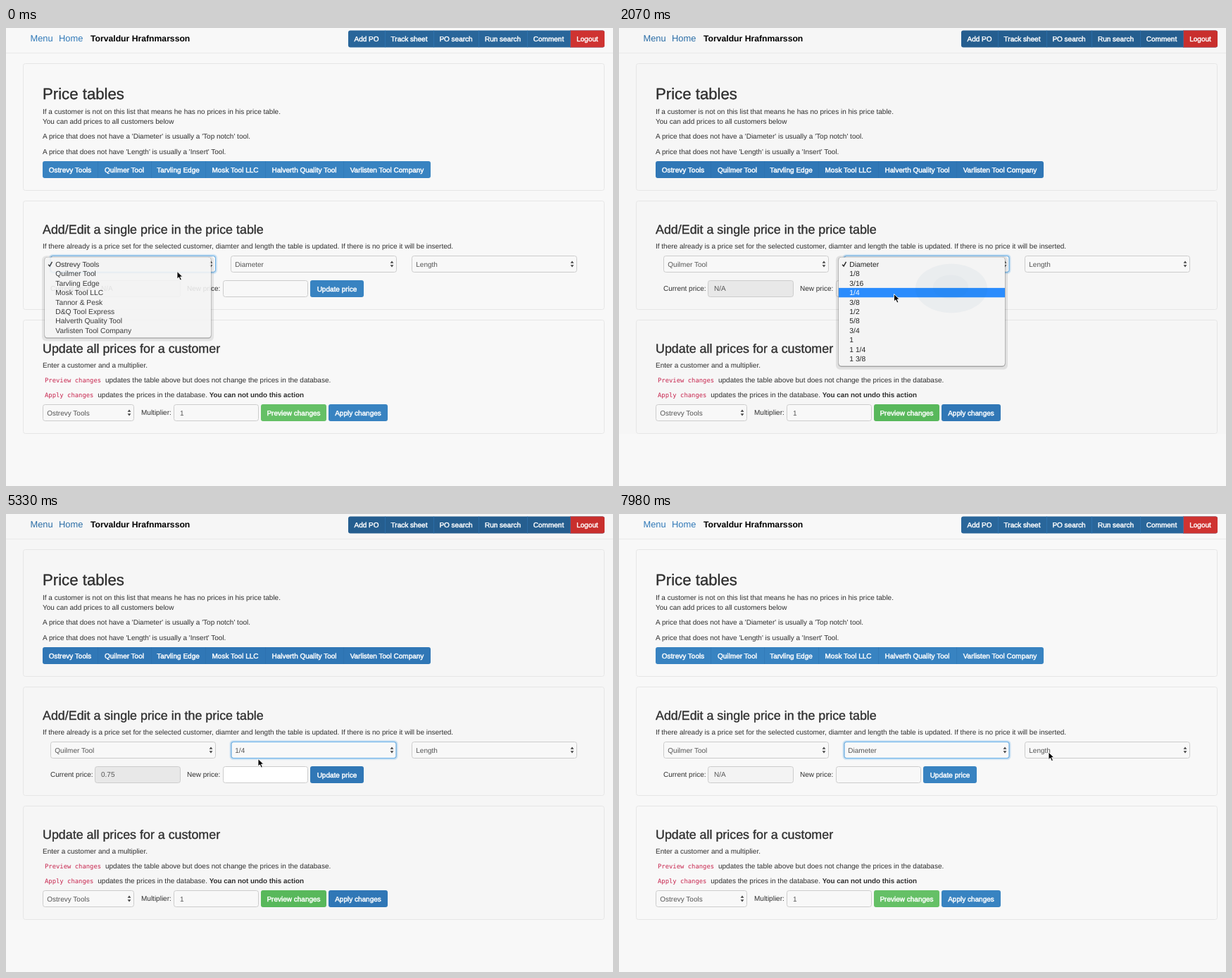
These frames come from a looping animation (862 px wide and 650 px high, 8000 ms). An HTML page:

```html
<!DOCTYPE html>
<html lang="en">
<head>
<meta charset="utf-8">
<title>Price tables</title>
<style>
html, body { margin: 0; width: 100%; height: 100%; overflow: hidden; background: #f8f8f8; }
svg {
  display: block; width: 862px; height: 650px;
  font-family: "Liberation Sans", Arial, sans-serif;
  text-rendering: geometricPrecision; cursor: default;
  --page: #f8f8f8; --nav: #29669a; --blue: #3883c1; --green: #65c066;
  --red: #cf3331; --off: #f3f3f3; --sep: #3178b5; --link: #3079b8;
}
svg.dim {
  --page: #f6f6f6; --nav: #255e8f; --blue: #3077b6; --green: #58b85b;
  --red: #c92f2d; --off: #e8e8e8; --sep: #2d71ae; --link: #2a6da6;
}
text { fill: #2f2f2f; white-space: pre; }
.head { stroke: #2f2f2f; stroke-width: .35; }
.btn { fill: #fff; stroke: #fff; stroke-width: .45; }
.val { fill: #555; }
.code { fill: #c7254e; font-family: "DejaVu Sans Mono", monospace; }
.panel { fill: none; stroke: #e6e6e6; }
.field { fill: #f8f8f8; stroke: #ccc; }
.item { fill: #222; }
.item.on { fill: #fff; }
</style>
</head>
<body>
<script>
const ROW = 13.4;
const CUSTOMERS = ['Ostrevy Tools', 'Quilmer Tool', 'Tarvling Edge', 'Mosk Tool LLC',
  'Tannor &amp; Pesk', 'D&amp;Q Tool Express', 'Halverth Quality Tool', 'Varlisten Tool Company'];
const DIAMETERS = ['Diameter', '1/8', '3/16', '1/4', '3/8', '1/2', '5/8', '3/4', '1', '1 1/4', '1 3/8'];

const text = (x, y, s, size = 10, attrs = '') =>
  `<text x="${x}" y="${y}" font-size="${size}" ${attrs}>${s}</text>`;
const rect = (x, y, w, h, attrs = '', r = 3) =>
  `<rect x="${x}" y="${y}" width="${w}" height="${h}" rx="${r}" ${attrs}/>`;
const panel = (y, h) => rect(24.5, y, 825, h, 'class="panel"');
const field = (x, y, w, attrs = '') => rect(x + .5, y + .5, w - 1, 23, `class="field" ${attrs}`);
const head = (y, s, size) => text(52, y, s, size, 'class="head"');
const code = (y, s) => text(55, y, s, 8.9, 'class="code"');

function select(x, y, w, value, id = '') {
  const ax = x + w - 7, ay = y + 12;
  return field(x, y, w) + text(x + 6.3, y + 15.7, value, 10, `class="val" ${id}`) +
    `<path d="M${ax - 2.4} ${ay - 1.2}h4.8l-2.4 -3.4zM${ax - 2.4} ${ay + 1.2}h4.8l-2.4 3.4z" fill="#444"/>`;
}

// edges: left sides of the buttons plus the right end; labels sit centred between them
function buttons(y, h, edges, labels, fill, extra = '') {
  const last = edges[edges.length - 1];
  return rect(edges[0], y, last - edges[0], h, `fill="var(--${fill})"`) + extra +
    edges.slice(1, -1).map(x => `<path d="M${x + .5} ${y}v${h}" stroke="var(--sep)" stroke-opacity=".7"/>`).join('') +
    labels.map((s, i) => text((edges[i] + edges[i + 1]) / 2, y + h / 2 + 3.6, s, 10,
      'class="btn" text-anchor="middle"')).join('');
}

function menu(id, x, top, items, checked, blur) {
  const h = items.length * ROW + 7, mid = top + 10;
  const clip = `clip-${id}`;
  return `<g id="${id}" visibility="hidden">
    <g class="shade">${rect(x - 4, top - 2, 244, h + 7, 'fill="#000" fill-opacity=".09"', 6)}
    ${rect(x - .7, top - .3, 237.4, h + 1.5, 'fill="#000" fill-opacity=".28"', 4.5)}</g>
    <clipPath id="${clip}">${rect(x, top, 236, h, '', 4)}</clipPath>
    <g clip-path="url(#${clip})">${rect(x, top, 236, h, 'fill="#f4f4f4"', 4)}
    ${rect(x, top, 236, ROW, 'class="bar" fill="#2b8cfd"', 0)}
    ${blur ? `<g fill="#005a78"><ellipse cx="472" cy="369.5" rx="51" ry="35" fill-opacity=".04"/>
    <ellipse cx="471" cy="367.5" rx="25" ry="17" fill-opacity=".025"/></g>` : ''}</g>
    ${items.map((s, i) => text(x + 15.3, mid + 3.6 + i * ROW, s, 10.3, 'class="item"')).join('')}
    <path class="tick" transform="translate(${x + 4.5} ${mid + checked * ROW})"
      d="M.6 .4L2.6 2.8L6 -3.4" fill="none" stroke="#222" stroke-width="1.4"/></g>`;
}

document.body.innerHTML = `<svg viewBox="0 0 862 650">
${rect(0, 0, 862, 650, 'fill="#f8f8f8"', 0)}${rect(0, 0, 862, 576, 'fill="var(--page)"', 0)}
<path d="M0 35.5H862" stroke="#e9e9e9"/>
${text(34.5, 19.3, 'Menu', 12.86, 'style="fill:var(--link)"')}
${text(75, 19.3, 'Home', 12.86, 'style="fill:var(--link)"')}
${text(120, 19.3, 'Torvaldur Hrafnmarsson', 12.2, 'font-weight="bold" style="fill:#000"')}
${buttons(3.5, 24, [486, 538, 607, 671, 740, 801, 850],
  ['Add PO', 'Track sheet', 'PO search', 'Run search', 'Comment', 'Logout'], 'nav',
  '<path d="M801 3.5h46a3 3 0 0 1 3 3v18a3 3 0 0 1 -3 3h-46z" fill="var(--red)"/>')}
${panel(50.5, 180)}${panel(245.5, 154)}${panel(414.5, 161)}
${head(100.5, 'Price tables', 22.2)}
${text(52, 122, 'If a customer is not on this list that means he has no prices in his price table.')}
${text(52, 136, 'You can add prices to all customers below')}
${text(52, 157.4, "A price that does not have a 'Diameter' is usually a 'Top notch' tool.")}
${text(52, 178.6, "A price that does not have 'Length' is usually a 'Insert' Tool.")}
${buttons(189, 24, [52, 130, 206, 283, 368, 479, 603],
  CUSTOMERS.filter((s, i) => i < 4 || i > 5), 'blue')}
${head(292.3, 'Add/Edit a single price in the price table', 17.86)}
${text(52, 312.8, 'If there already is a price set for the selected customer, diamter and length the table is updated. If there is no price it will be inserted.')}
${select(63, 323, 235, CUSTOMERS[0], 'id="customer"')}
${select(319, 323, 236, 'Diameter', 'id="diameter"')}
${select(576, 323, 235, 'Length')}
<g id="focus" fill="none">${rect(62.5, 322.5, 236, 25, 'stroke="#66afe9" stroke-opacity=".3" stroke-width="3"', 4)}
${rect(63.5, 323.5, 234, 23, 'stroke="#66afe9"')}</g>
${text(63, 373.2, 'Current price:')}
${field(126, 358, 122, 'style="fill:var(--off)"')}${text(135, 373.4, 'N/A', 10, 'class="val" id="price"')}
${text(257, 373.2, 'New price:')}${field(308, 358, 121, 'id="fresh"')}
${buttons(358, 24, [432, 508], ['Update price'], 'blue')}
${head(461.2, 'Update all prices for a customer', 17.86)}
${text(52, 481.5, 'Enter a customer and a multiplier.')}
${code(502.5, 'Preview changes')}
${text(141, 502.5, 'updates the table above but does not change the prices in the database.')}
${code(523.7, 'Apply changes')}
${text(130.3, 523.7, 'updates the prices in the database.')}
${text(288.7, 523.7, 'You can not undo this action', 9.85, 'font-weight="bold"')}
${select(52, 534, 130, CUSTOMERS[0])}
${text(192, 549.4, 'Multiplier:')}${field(238, 534, 121)}${text(247, 549.7, '1', 10, 'class="val"')}
${buttons(534, 24, [362, 455], ['Preview changes'], 'green')}
${buttons(534, 24, [458, 542], ['Apply changes'], 'blue')}
${menu('customers', 55, 325.3, CUSTOMERS, 0, false)}
${menu('sizes', 312, 325.3, DIAMETERS, 0, true)}
${menu('resize', 312, 285.2, DIAMETERS, 3, true)}
<g id="cursor"><path d="M0 0V10.6L2.5 8.3L4.4 12.6L6.4 11.7L4.5 7.6H7.8Z" fill="#000" stroke="#fff" stroke-width=".9"/>
<g id="deny" fill="none"><circle cx="6.3" cy="15.5" r="5.6" stroke="#999" stroke-width="1.8" fill="#eee"/>
<path d="M2.4 11.6l7.8 7.8" stroke="#999" stroke-width="1.6"/></g></g>
</svg>`;

const $ = s => document.querySelector(s);
const svg = $('svg');

// pointer moves: first step, last step, number of steps, x, y
const MOVES = [
  [270, 620, 6, 397, 334.5], [1080, 1650, 11, 390.5, 377.5], [2250, 2250, 1, 390, 376],
  [2420, 2540, 2, 389.5, 370], [3660, 3660, 1, 387, 369.5], [3840, 4060, 4, 174, 375.5],
  [4120, 4330, 4, 140, 380], [4390, 4630, 5, 163, 373], [5040, 5330, 5, 358, 347.5],
  [5390, 5740, 7, 382, 339], [6210, 6210, 1, 381.5, 337.5], [6390, 6560, 4, 384, 310],
  [6730, 6850, 3, 387, 296], [7440, 7520, 2, 404, 302], [7700, 7980, 6, 610, 338]
];
// menus: [time, opacity, highlight]
const MENUS = {
  customers: [[0, .88, 0], [60, 0, 0]],
  sizes: [[0, 0, 0], [790, 1, 1], [2900, 1, 0], [2960, 1, 1], [3020, .85, 0], [3090, .55, 0], [3150, .2, 0], [3210, 0, 0]],
  resize: [[0, 0, 0], [5910, 1, 1], [7140, 1, 0], [7200, 1, 1], [7260, .85, 0], [7440, 0, 0]]
};
const TOPS = { customers: 325.3, sizes: 325.3, resize: 285.2 };
const DIM = [[2070, 3210], [4690, 5970], [7140, 7440]];

const within = (t, a, b) => t >= a && t < b;

function pointer(t) {
  let x = 243, y = 345.5;
  for (const [a, b, n, tx, ty] of MOVES) {
    if (t < a) break;
    const k = n === 1 ? 1 : Math.min(1, (Math.floor((t - a) / (b - a) * (n - 1) + 1e-6) + 1) / n);
    x += (tx - x) * k;
    y += (ty - y) * k;
  }
  return [x, y];
}

function drawMenu(id, t, y) {
  const [, alpha, lit] = MENUS[id].filter(s => s[0] <= t).pop();
  const g = $('#' + id), items = g.querySelectorAll('.item'), top = TOPS[id];
  const row = Math.max(0, Math.min(items.length - 1, Math.round((y - top - 10) / ROW)));
  const bar = g.querySelector('.bar'), tick = g.querySelector('.tick');
  const checked = id === 'resize' ? 3 : 0;
  g.setAttribute('visibility', alpha ? 'visible' : 'hidden');
  g.setAttribute('opacity', alpha);
  bar.setAttribute('y', top + 3.4 + row * ROW);
  bar.setAttribute('opacity', lit);
  items.forEach((el, i) => el.classList.toggle('on', !!lit && i === row));
  tick.setAttribute('stroke', lit && row === checked ? '#fff' : '#222');
}

function draw(t) {
  const [x, y] = pointer(t);
  const quarter = within(t, 2960, 7260);
  svg.classList.toggle('dim', DIM.some(d => within(t, ...d)));
  $('#customer').innerHTML = CUSTOMERS[t < 60 ? 0 : 1];
  $('#diameter').textContent = quarter ? '1/4' : 'Diameter';
  $('#price').textContent = quarter ? '0.75' : 'N/A';
  $('#fresh').style.fill = within(t, 3840, 5910) ? '#fff' : '';
  $('#focus').setAttribute('transform', `translate(${t < 910 ? 0 : 256.5} 0)`);
  $('#sizes .shade').setAttribute('opacity', t < 910 ? .45 : 1);
  for (const id in MENUS) drawMenu(id, t, y);
  $('#cursor').setAttribute('transform', `translate(${x} ${y})`);
  const denied = within(t, 3840, 5910) && x > 126 && x < 248 && y > 358 && y < 382;
  $('#deny').setAttribute('visibility', denied ? 'visible' : 'hidden');
}

const start = performance.now();
function tick(now) {
  draw(Math.max(0, now - start) % 8000);
  requestAnimationFrame(tick);
}
draw(0);
requestAnimationFrame(tick);
</script>
</body>
</html>
```
